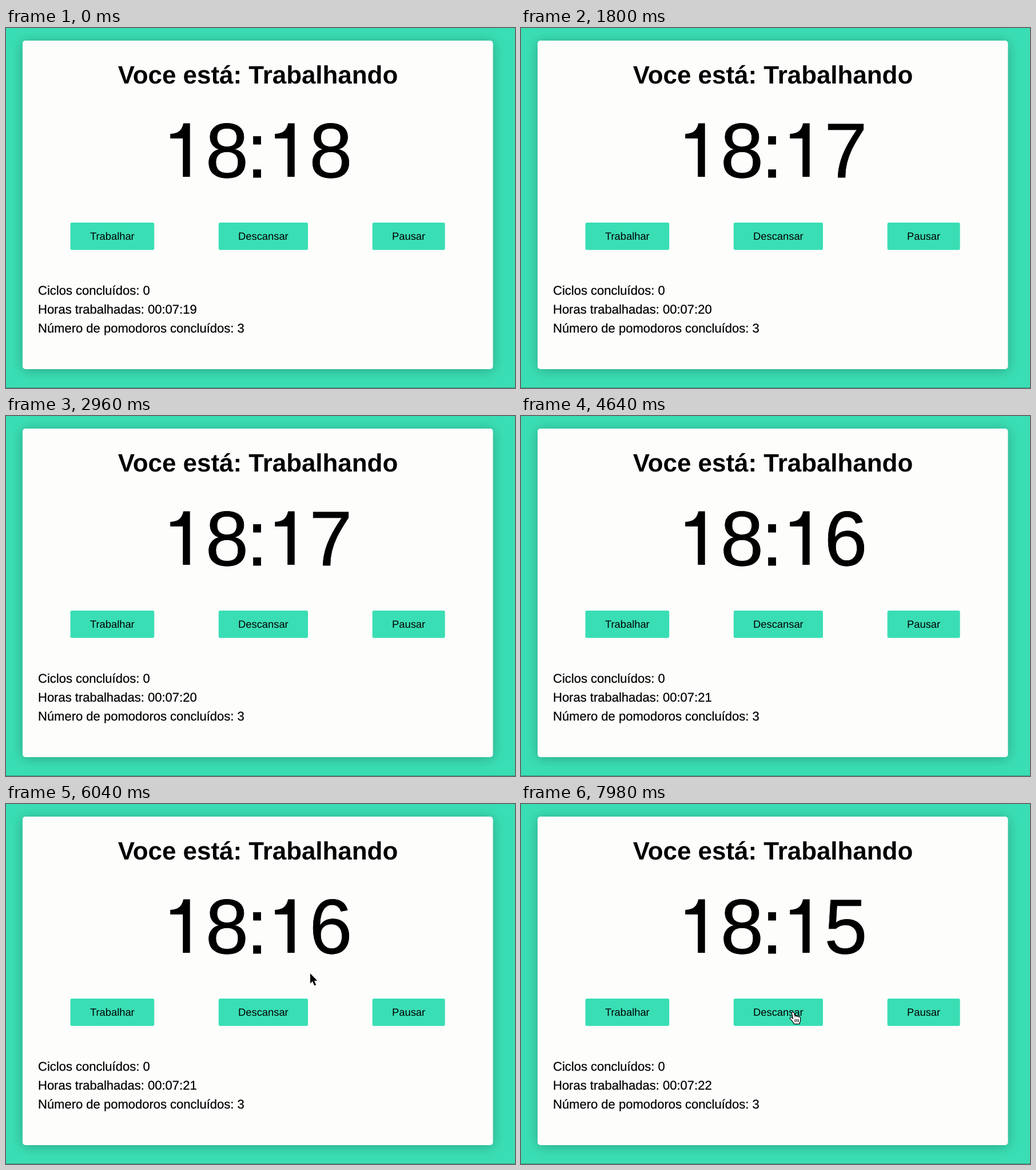
Animation, 890 px wide and 629 px high, one loop 8000 ms. Source, as an HTML page:

```html
<!DOCTYPE html>
<html lang="pt">
<head>
<meta charset="utf-8">
<title>Pomodoro</title>
<style>
  html, body { margin: 0; width: 100%; height: 100%; overflow: hidden; background: #3adeb4; }
  svg { display: block; width: 100vw; height: 100vh; }
  text { font-family: "Liberation Sans", Arial, sans-serif; fill: #000; white-space: pre; text-rendering: geometricPrecision; }
  .title { font-size: 43.9px; font-weight: 700; text-anchor: middle; }
  .clock { font-size: 135.5px; letter-spacing: -2px; stroke: #000; stroke-width: .8px; }
  .clock .blank { fill: none; stroke: none; }
  .label { font-size: 18.33px; text-anchor: middle; }
  .stat { font-size: 22px; stroke: #000; stroke-width: .25px; }
</style>
</head>
<body>
<svg viewBox="0 0 890 629">
  <defs>
    <filter id="soft" x="-10%" y="-10%" width="120%" height="120%">
      <feGaussianBlur stdDeviation="11"/>
    </filter>
    <path id="one" d="M0 26.5V18.5C14 17.5 20 13 23 0H34.5V93.5H22V26.5Z"/>
  </defs>
  <rect width="890" height="629" fill="#3adeb4"/>
  <rect x="29" y="24" width="822.5" height="574" rx="5" fill-opacity=".26" filter="url(#soft)"/>
  <rect x="29" y="22" width="822.5" height="574" rx="5" fill="#fdfdfc"/>
  <rect y="628" width="890" height="1" fill-opacity=".3"/>

  <text class="title" x="440.5" y="97.3">Voce está: Trabalhando</text>

  <!-- the footless digits 1 are drawn over the blank ones -->
  <text class="clock" x="275.5" y="260.7"><tspan class="blank">1</tspan>8<tspan dx="-2">:</tspan><tspan class="blank" dx="1">1</tspan><tspan id="unit">8</tspan></text>
  <use href="#one" x="287.2" y="166.6"/>
  <use href="#one" x="470.2" y="166.6"/>

  <g id="buttons"></g>

  <text class="stat" x="56" y="466">Ciclos concluídos: 0</text>
  <text class="stat" x="56" y="499" id="hours"></text>
  <text class="stat" x="56" y="532">Número de pomodoros concluídos: 3</text>

  <g id="cursor" stroke-linejoin="round" stroke-linecap="round">
    <path id="arrow" d="M0 0V17.5L4 13.8 7.2 21.2 10.2 19.9 7 12.7H12.3Z"
      stroke="#fff" stroke-width="2.4" paint-order="stroke"/>
    <g id="hand" stroke="#000" stroke-width="1.2">
      <path fill="#fff" d="M-2.6 1.4C-2.6-.8 .9-1 1.6 1.2L3.2 7.2C3.5 5.5 6 5.5 6.5 7.4 7.2 6 9.3 6.4 9.6 8.1 10.8 7.2 12.6 8.1 12.6 10V14C12.6 16.4 11.1 17.2 10.8 20.4H1.4C.8 17.5-2.6 14.4-5.2 11.4-6.8 9.2-4.2 7.6-2.4 9.2L-.5 10.8Z"/>
      <path fill="none" d="M3.2 12V16.5M6 12V16.5M8.8 12V16.5"/>
    </g>
  </g>
</svg>
<script>
const LOOP = 8000, FIRST_TICK = 1400, TICK = 2520;
const CURSOR_ON = 5760, BUTTON_TOP = 340;
const path = [
  [5760, 542, 283],
  [6040, 532, 296],
  [6700, 500, 334],
  [7400, 476, 364]
];
const $ = id => document.getElementById(id);

$("buttons").innerHTML = [
  ["Trabalhar", 112.5, 146.7],
  ["Descansar", 371.8, 156.2],
  ["Pausar", 640.6, 127]
].map(([name, x, w]) =>
  `<rect x="${x}" y="340" width="${w}" height="47.8" rx="2.7" fill="#3adeb4"/>
   <text class="label" x="${x + w / 2}" y="370">${name}</text>`).join("");

function cursorAt(t) {
  let i = 0;
  while (i < path.length - 2 && t > path[i + 1][0]) i++;
  const [t0, x0, y0] = path[i], [t1, x1, y1] = path[i + 1];
  const k = Math.min(1, Math.max(0, (t - t0) / (t1 - t0)));
  const e = i === path.length - 2 ? k * (2 - k) : k;
  return [x0 + (x1 - x0) * e, y0 + (y1 - y0) * e];
}

function show(id, on) {
  $(id).setAttribute("visibility", on ? "visible" : "hidden");
}

function draw(t) {
  const ticks = Math.max(0, Math.floor((t - FIRST_TICK) / TICK) + 1);
  $("unit").textContent = 8 - ticks;
  $("hours").textContent = "Horas trabalhadas: 00:07:" + (19 + ticks);

  const [x, y] = cursorAt(t), on = t >= CURSOR_ON, over = y >= BUTTON_TOP;
  $("cursor").setAttribute("transform", `translate(${x} ${y})`);
  show("arrow", on && !over);
  show("hand", on && over);
}

const start = performance.now();
function frame() {
  draw((performance.now() - start) % LOOP);
  requestAnimationFrame(frame);
}
frame();
</script>
</body>
</html>
```
